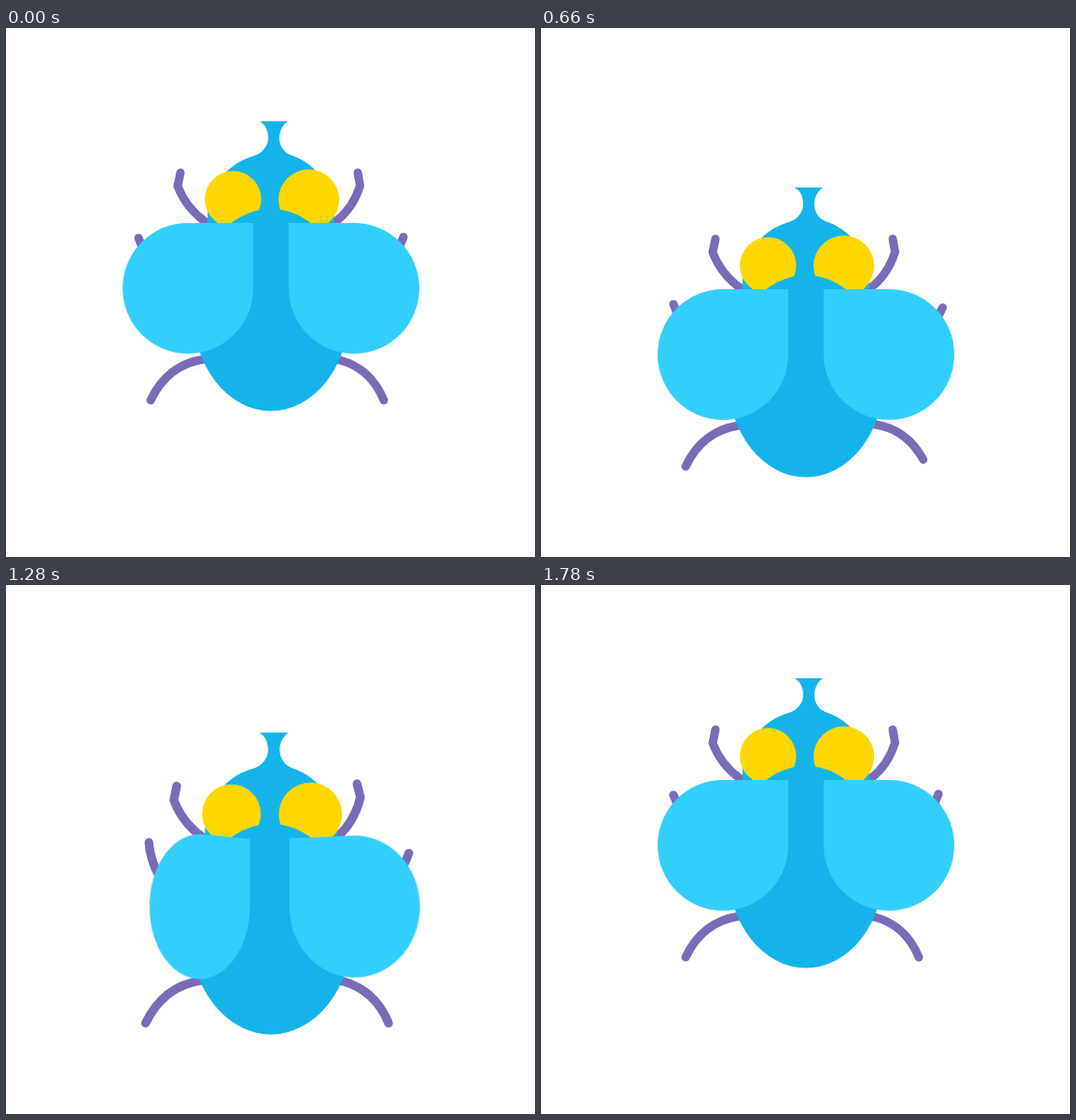
Write an HTML page that moves like this. It is 567 px wide and 567 px high and loops after 2060 ms.

```html
<!DOCTYPE html>
<html lang="en">
<head>
<meta charset="utf-8">
<title>Fly</title>
<style>
  html, body { margin: 0; width: 100%; height: 100%; overflow: hidden; background: #fff; }
  #stage { position: relative; width: 100%; height: 100%; overflow: hidden; contain: strict; }
  #fly { position: absolute; left: 0; top: 0; width: 567px; height: 567px; transform-origin: 284px 255.2px; }
  svg { display: block; }
  .legs { fill: none; stroke: #7a6bb8; stroke-width: 9; stroke-linecap: round; stroke-linejoin: round; }
  .body { fill: #14b4eb; }
  .eyes { fill: #ffd700; }
  .wing { position: absolute; top: 209.2px; width: 140px; height: 139.8px; background: #33cffc; }
  #left { left: 125px; border-radius: 70px 0 70px 70px; transform-origin: 132px 50%; }
  #right { left: 303px; border-radius: 0 70px 70px 70px; transform-origin: 0 50%; }
</style>
</head>
<body>
<div id="stage">
  <div id="fly">
    <svg width="567" height="567">
      <g class="legs" id="legs"></g>
      <path class="body" d="M272 100H302C296 104 293 111 293 118C293 126 298 134 306 136.500C334 146 352 172 352 204V230H216V204C216 172 236 145 267 136.500C275 134 281 126 281 118C281 111 279 104 272 100Z"/>
      <g class="eyes">
        <circle cx="243.300" cy="183.500" r="30.200"/>
        <circle cx="324.600" cy="184" r="32.500"/>
      </g>
      <ellipse class="body" cx="284" cy="302.300" rx="84" ry="108.300"/>
    </svg>
    <div class="wing" id="left"></div>
    <div class="wing" id="right"></div>
  </div>
</div>
<script>
const LOOP = 2060, TAKEOFF = 1000, BEAT = 200;
const $ = id => document.getElementById(id);

// walk and lift hold the swing in degrees on each beat
const legs = [
  { d: 'M187 155L184 169.500Q193 193 214 208L225 215', pivot: '225 215', walk: [12, -15] },
  { d: 'M377 155L379.500 169Q372 193 354 207L343 215', pivot: '343 215', walk: [-1, -21], lift: [5, -21] },
  { d: 'M142 225Q153 258 196 282', pivot: '196 282', walk: [12, 19], lift: [12, 20] },
  { d: 'M426 224Q415 257 372 281', pivot: '372 281', walk: [-2, -20, 6] },
  { d: 'M155 399Q173 361 212 355L228 352', pivot: '228 352', walk: [12, -10] },
  { d: 'M405 399Q391 365 358 356L340 352', pivot: '340 352', walk: [-12, -20, -8] }
];

for (const leg of legs) {
  leg.el = document.createElementNS('http://www.w3.org/2000/svg', 'path');
  leg.el.setAttribute('d', leg.d);
  $('legs').append(leg.el);
}

function ease(t, start, end) {
  const u = Math.min(1, Math.max(0, (t - start) / (end - start)));
  return u * u * (3 - 2 * u);
}

// Smooth rise and fall for u from 0 to 1
const pulse = u => u > 0 && u < 1 ? Math.sin(Math.PI * u) ** 2 : 0;

// Overlapping pulses, one per beat
const swing = (t, angles = []) =>
  angles.reduce((sum, a, i) => sum + a * pulse((t / BEAT - i) / 2), 0);

function flap(id, t, angle, period, beats) {
  const u = (t - TAKEOFF - 16) / period;
  const turn = u < beats ? angle * pulse(u % 1) : 0;
  $(id).style.transform = turn ? `perspective(820px) rotateY(${turn}deg)` : 'none';
}

function draw() {
  const t = performance.now() % LOOP;
  const y = 71 * (ease(t, 0, 420) - ease(t, 1188, 1692));
  const size = 1 + 0.07 * (ease(t, TAKEOFF, 1500) - ease(t, 1500, 1780));
  $('fly').style.transform = `translateY(${y}px) scale(${size})`;
  for (const { el, pivot, walk, lift } of legs) {
    const angle = swing(t, walk) + swing(t - TAKEOFF, lift);
    el.setAttribute('transform', `rotate(${angle} ${pivot})`);
  }
  flap('left', t, 52, 103, 7);
  flap('right', t, -60, 81.8, 9);
  requestAnimationFrame(draw);
}
draw();
</script>
</body>
</html>
```
